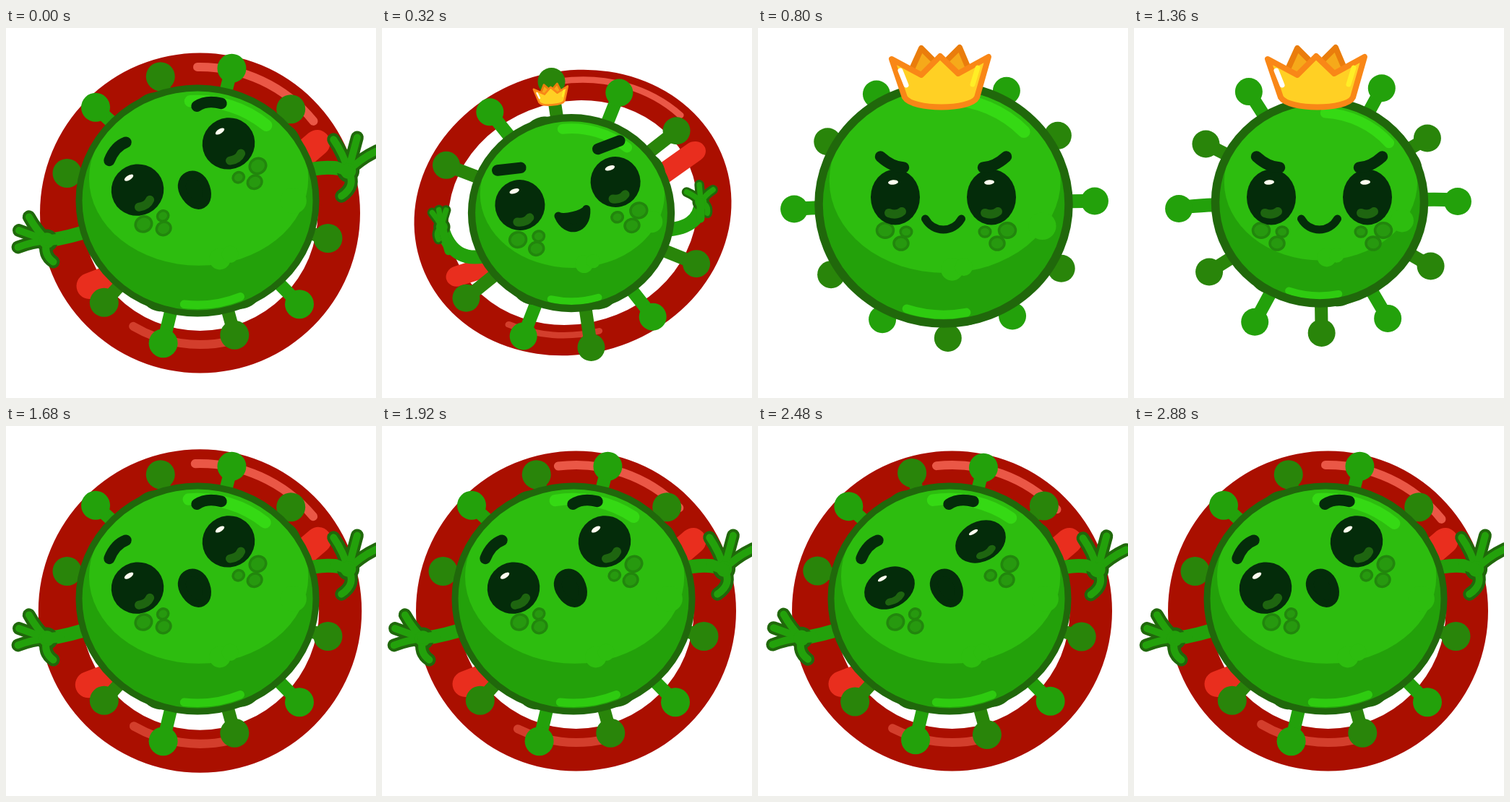
Animation of 512 by 512 pixels, one loop 2960 ms. Source, as an HTML page with a canvas:

```html
<!DOCTYPE html>
<html lang="en">
<head>
<meta charset="utf-8">
<title>Virus mood swing</title>
<style>
  html, body { margin: 0; width: 100%; height: 100%; overflow: hidden; background: #fff; }
  canvas { display: block; width: 100vmin; height: 100vmin; }
</style>
</head>
<body>
<canvas id="stage" width="512" height="512"></canvas>
<script>
const ctx = document.getElementById('stage').getContext('2d');
const LOOP = 2960, STEP = 80, TAU = Math.PI * 2, RAD = Math.PI / 180;
const color = {
  ring: '#aa0f00', bar: '#e92e1e', shineTop: '#ea5746', shineLow: '#d33e2c',
  rim: '#20680b', shade: '#23a10a', bright: '#2dbd0f', gloss: '#35d914', glossLow: '#2ecb10',
  light: '#23a10b', dark: '#29850a', ink: '#042c0a', reflect: '#1e6510',
  spot: '#27990f', spotRim: '#22860d',
  gold: '#ffd024', amber: '#f6a91a', orange: '#f98717', deepOrange: '#ea7d0c'
};

const lerp = (a, b, k) => a + (b - a) * k;
const clamp = v => Math.max(0, Math.min(1, v));
// Mood p runs from scared (0) through shrinking (1) to royal (2).
const mood = (p, scared, small, royal) => p < 1 ? lerp(scared, small, p) : lerp(small, royal, p - 1);

function track(t, ...keys) {
  let last = keys[0];
  for (const key of keys) {
    if (t < key[0]) {
      const k = clamp((t - last[0]) / (key[0] - last[0] || 1));
      return lerp(last[1], key[1], k * k * (3 - 2 * k));
    }
    last = key;
  }
  return last[1];
}

function fill(style) { ctx.fillStyle = style; ctx.fill(); }
function stroke(style, width) { ctx.strokeStyle = style; ctx.lineWidth = width; ctx.stroke(); }
function oval(x, y, rx, ry = rx, angle = 0) {
  ctx.beginPath();
  ctx.ellipse(x, y, rx, ry, angle, 0, TAU);
}
function poly(...pts) {
  ctx.beginPath();
  for (let i = 0; i < pts.length; i += 2) ctx.lineTo(pts[i], pts[i + 1]);
}
function curve(x0, y0, x1, y1, x2, y2) {
  ctx.beginPath();
  ctx.moveTo(x0, y0);
  ctx.quadraticCurveTo(x1, y1, x2, y2);
}
function arc(rx, ry, from, to) {
  ctx.beginPath();
  ctx.ellipse(0, 0, rx, ry, 0, from * RAD, to * RAD);
}
function polar(x, y, angle, rx, ry = rx) {
  return [x + Math.cos(angle * RAD) * rx, y + Math.sin(angle * RAD) * ry];
}
function group(x, y, angle, draw) {
  ctx.save();
  ctx.translate(x, y);
  ctx.rotate(angle * RAD);
  draw();
  ctx.restore();
}

function drawRing({ t, p, swing }) {
  const leaving = t < 900;
  const flat = leaving ? track(t, [80, 1], [320, .883], [520, 0]) : 1;
  const size = leaving ? track(t, [320, 1], [520, .6])
    : track(t, [1480, 0], [1680, 1.01], [1760, 1.062], [1860, 1]);
  if (flat < .02 || size < .02) return;
  const k = leaving ? clamp(p) : 0;
  const axis = -16.6;
  group(lerp(268.5, 264, k), lerp(256, 255.5, k), axis, () => {
    ctx.scale(size, size * flat);
    ctx.rotate(-axis * RAD);
    ctx.beginPath();
    ctx.arc(0, 0, 221.5, 0, TAU);
    ctx.arc(0, 0, lerp(163, 174, k), 0, TAU, true);
    fill(color.ring);
    group(0, 0, 3 * k, () => {
      poly(-153, 101, 0, 42, 162, -97);
      stroke(color.bar, lerp(36, 32, k));
    });
    const top = lerp(202, 206, k), low = lerp(182, 190, k), width = lerp(12, 9.5, k);
    arc(top, top, -91 + swing, -39 + swing);
    stroke(color.shineTop, width);
    arc(low, low, 77, 120.5 + swing * .7);
    stroke(color.shineLow, width);
  });
}

// Twelve evenly spaced limbs: ten spikes, and arms at slots 0 and 6.
function drawLimbs(s) {
  const { p, puff, wobble, body } = s;
  const x = mood(p, 265, 262, lerp(255, 258, puff));
  const y = mood(p, 246, 258, 245);
  const twist = mood(p, -16, -8.5, -1.5);
  const lightReach = mood(p, 196, 181, lerp(184, 180, puff)) - 2 * wobble;
  const darkReach = mood(p, 186, 186, lerp(177, 184, puff)) + 2.5 * wobble;
  for (let slot = 0; slot < 12; slot++) {
    const angle = slot * 30 + twist;
    if (slot % 6 === 0) {
      drawArm(s, slot ? -1 : 1, angle, x, y);
      continue;
    }
    const isDark = slot % 2 === 1;
    const tone = isDark ? color.dark : color.light;
    const [bx, by] = polar(x, y, angle, isDark ? darkReach : lightReach);
    poly(bx, by, lerp(bx, body.x, .5), lerp(by, body.y, .5));
    stroke(tone, 18);
    oval(bx, by, lerp(20, 19, clamp(p)));
    fill(tone);
  }
}

function drawArm({ t, p, puff, wobble, body }, side, angle, x, y) {
  const droop = side * 20 * clamp(1 - Math.abs(p - 1));
  const raise = 3 * clamp(2 - p);
  const overshoot = track(t, [520, 0], [640, 38], [760, 0]);
  const reach = mood(p, 214, 180, lerp(193, 208, puff)) + overshoot - 4 * wobble;
  const [hx, hy] = polar(x, y, angle + raise, reach);
  const shoulder = polar(body.x, body.y, angle + droop, body.rx * .9, body.ry * .9);
  const bend = polar(body.x, body.y, angle + droop * .8, Math.min(reach, 186));
  curve(...shoulder, ...bend, hx, hy);
  stroke(color.light, 19);

  const ball = clamp((p - 1.2) / .6);
  if (ball < 1) {
    const k = Math.min(p, 1);
    const dir = side < 0 ? lerp(200, 260, k) : lerp(285, 265, k);
    const spread = side < 0 ? lerp(33, 24, k) : lerp(40, 50, k);
    const thumb = dir + side * lerp(side < 0 ? 127 : 180, 155, k);
    const length = lerp(side < 0 ? 41 : 48, 24, k) * (1 - ball);
    const slim = lerp(1, .75, k) * (1 - ball);
    for (const [tone, width] of [[color.rim, 18], [color.light, 10]]) {
      for (const finger of [dir - spread, dir, dir + spread, thumb]) {
        const tip = polar(hx, hy, finger, length * (finger === thumb ? .75 : 1));
        curve(hx, hy, ...polar(hx, hy, lerp(finger, dir, .25), length * .5), ...tip);
        stroke(tone, width * slim);
      }
      oval(hx, hy, (width + 8) * .6 * slim);
      fill(tone);
    }
    // Join the wrist to the palm without an outline across it.
    poly(lerp(bend[0], hx, .4), lerp(bend[1], hy, .4), hx, hy);
    stroke(color.light, 15 * slim);
  }
  if (ball > 0) {
    oval(hx, hy, 19 * ball);
    fill(color.light);
  }
}

function drawBody({ p, swing, body: { x, y, rx, ry } }) {
  const turn = 6.5 * p;
  const at = (angle, distance) => polar(0, 0, angle + turn, rx * distance, ry * distance);
  group(x, y, 0, () => {
    for (const angle of [65, 111, -36, -115]) {
      oval(...at(angle, .955), 21, 13, (angle + turn + 90) * RAD);
      fill(color.rim);
    }
    oval(0, 0, rx, ry);
    fill(color.shade);
    oval(.01 * rx, -.2 * ry, .925 * rx, .775 * ry);
    fill(color.bright);
    for (const [angle, distance, size] of [[70, .55, .09], [60, .55, .07], [0, .81, .11]]) {
      oval(...at(angle, distance), size * rx);
      fill(color.bright);
    }
    const shift = turn * .65 + swing;
    arc(rx * .885, ry * .885, -94 + shift, -49 + shift);
    stroke(color.gloss, rx * .1);
    arc(rx * .925, ry * .925, 67 + turn * .9, 97 + turn * .9);
    stroke(color.glossLow, rx * .07);
    oval(0, 0, rx, ry);
    stroke(color.rim, lerp(9, 11.5, clamp(p / 2)));
  });
}

function drawEye(p, lid, side) {
  for (const [x, y, r] of [[4 + side * 18, 46, 11.5], [3 - side * 12, 48, 7.8], [8, 64, 10]]) {
    oval(x, y, r, r * .9);
    fill(color.spot);
    stroke(color.spotRim, 3.5);
  }
  ctx.scale(1, lid);
  oval(0, 0, mood(p, 36.5, 34.5, 34), mood(p, 35.5, 35, 38.5));
  fill(color.ink);
  curve(-9, 22, 2, 26, 9, 20);
  stroke(color.reflect, 12);
  oval(-3, -20.5, 7, 3.2, -.08);
  fill('#fffff0');
}

function drawFace({ t, p }) {
  const lid = track(t, [2400, 1], [2480, .78], [2560, .12], [2640, .78], [2720, 1]);
  const gap = mood(p, 70.7, 68, 66.5);
  group(mood(p, 245, 257, 256.5), mood(p, 192, 229, 234), mood(p, -27, -13.6, 0), () => {
    const inner = mood(p, -66, -50, -41), outer = mood(p, -54, -54, -56);
    const bend = (inner + outer) / 2 + mood(p, -8, 0, 7);
    for (const side of [-1, 1]) {
      group(side * gap, 0, 0, () => drawEye(p, lid, side));
      curve(side * 55, inner, side * 71, bend, side * 87, outer);
      stroke(color.ink, 15.5);
    }
    const w = mood(p, 16, 20, 25), y = mood(p, 33, 27, 30);
    const top = mood(p, 8, 33, 50), bottom = mood(p, 67, 56, 50);
    const pull = w * mood(p, .95, .75, .55);
    ctx.beginPath();
    ctx.moveTo(-w, y);
    ctx.bezierCurveTo(-pull, top, pull, top, w, y);
    ctx.bezierCurveTo(pull, bottom, -pull, bottom, -w, y);
    ctx.closePath();
    fill(color.ink);
    stroke(color.ink, 11);
  });
}

function drawCrown({ p }) {
  const size = mood(p, -.3, .35, 1);
  if (size < .02) return;
  const k = clamp(p - 1);
  group(lerp(234, 252, k), lerp(92, 68, k), lerp(-4, 0, k), () => {
    ctx.scale(size, size);
    poly(-46, 4, -26, -40, 0, -14, 27, -41, 46, 4);
    ctx.closePath();
    fill(color.amber);
    stroke(color.deepOrange, 8);
    poly(-67, -25, -26, -3, 0, -29, 25, -5, 67, -28, 51, 28);
    ctx.bezierCurveTo(42, 46, -38, 46, -49, 28);
    ctx.closePath();
    fill(color.gold);
    stroke(color.orange, 8);
    poly(-55, -9, -47, 11);
    stroke('#fff', 7);
    poly(52, -13, 45, 10);
    stroke('#ffee26', 7);
  });
}

function draw(t) {
  const p = track(t, [0, 0], [80, -.06], [320, 1], [560, 2], [1440, 2], [1560, 1],
    [1680, 0], [1760, -.07], [1860, 0]);
  const puff = (1 + Math.cos(TAU * (t - 800) / 1120)) / 2;
  const scene = {
    t, p, puff,
    swing: -3 * (1 - Math.cos(TAU * (t < 1440 ? t : t - 1600) / 640)),
    wobble: t < 1920 ? 0 : (1 - Math.cos(TAU * (t - 1920) / 960)) / 2,
    body: {
      x: mood(p, 265, 262, 257),
      y: mood(p, 239, 256, lerp(241, 244, puff)),
      rx: mood(p, 164, 138, lerp(144.5, 173, puff)),
      ry: mood(p, 156, 132, lerp(140, 165, puff))
    }
  };
  ctx.fillStyle = '#fff';
  ctx.fillRect(0, 0, 512, 512);
  ctx.lineCap = ctx.lineJoin = 'round';
  for (const part of [drawRing, drawLimbs, drawBody, drawFace, drawCrown]) part(scene);
}

const start = performance.now();
function tick() {
  const elapsed = (performance.now() - start) % LOOP;
  draw(Math.floor(elapsed / STEP) * STEP);
  requestAnimationFrame(tick);
}
tick();
</script>
</body>
</html>
```
